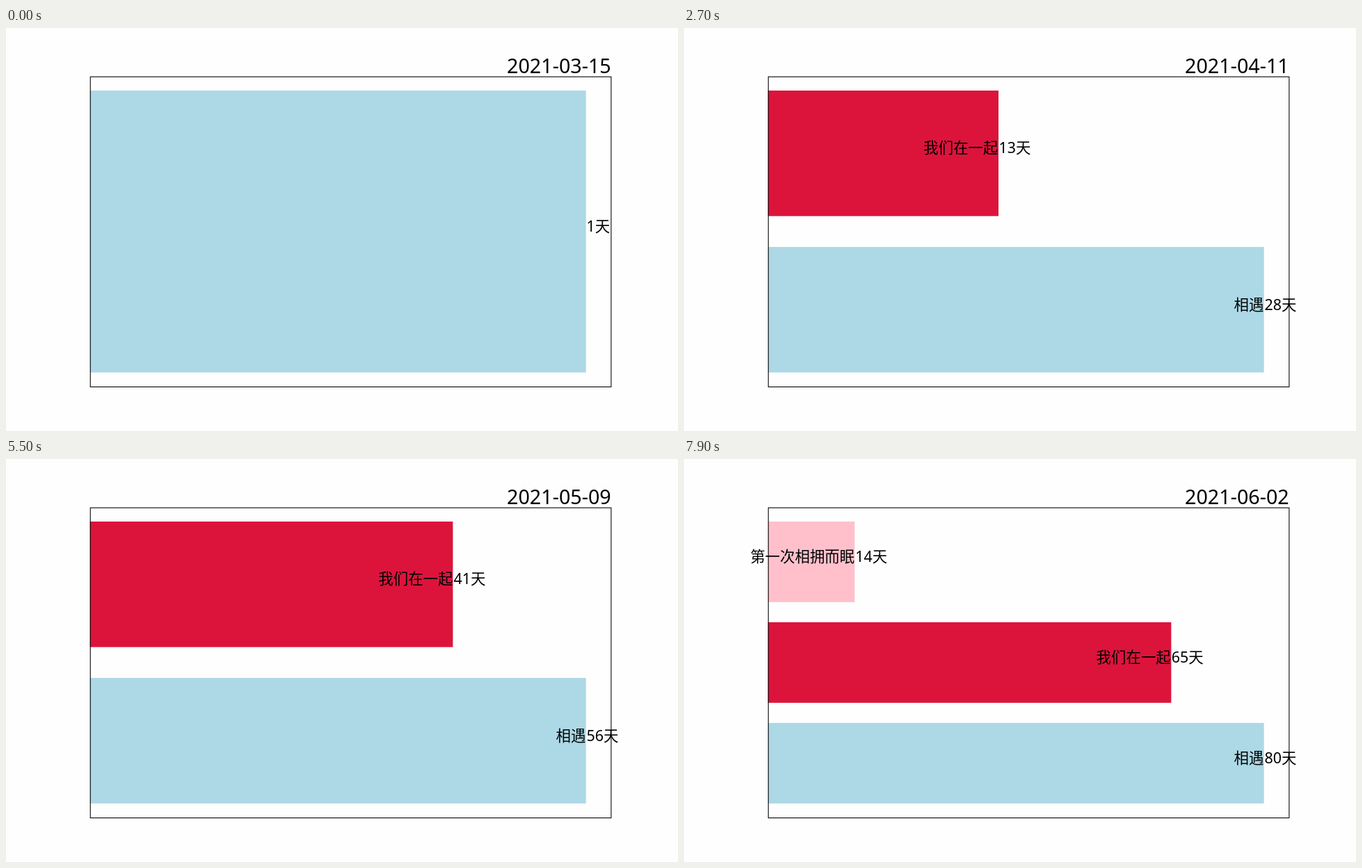
Animation of 966x580 px, one loop 8000 ms. Source, as an HTML page:

```html
<!DOCTYPE html>
<html lang="zh-CN">
<head>
<meta charset="utf-8">
<style>
  html, body { margin: 0; width: 100%; height: 100%; overflow: hidden; background: #fefefe; }
  svg { display: block; }
  text { font-family: "Noto Sans", "Noto Sans CJK SC", "Noto Sans CJK", sans-serif; fill: #000; white-space: pre; }
  .label { font-size: 22.2px; }
  .date { font-size: 29.7px; }
  .end { text-anchor: end; }
</style>
</head>
<body>
<svg width="966" height="580" viewBox="0 0 1000 600">
  <g id="bars"></g>
  <rect x="125.5" y="72.5" width="775" height="462" fill="none" stroke="#000" stroke-width="1.11"/>
  <g id="labels"></g>
  <text id="date" class="date end" x="900.4" y="67.1"></text>
</svg>
<script>
  const LOOP = 8000, STEP = 100;
  const LEFT = 125, FULL = 775 / 1.05, TOP = 93, BOTTOM = 513;
  const events = [
    { name: '相遇', color: '#add8e6', start: 0 },
    { name: '我们在一起', color: '#dc143c', start: 15 },
    { name: '第一次相拥而眠', color: '#ffc0cb', start: 66 }
  ];
  const byId = id => document.getElementById(id);

  function place(node, attrs) {
    for (const key in attrs) node.setAttribute(key, attrs[key]);
    return node;
  }

  function add(parent, tag, attrs) {
    const node = document.createElementNS('http://www.w3.org/2000/svg', tag);
    return byId(parent).appendChild(place(node, attrs));
  }

  for (const event of events) {
    event.bar = add('bars', 'rect', { fill: event.color });
    event.title = add('labels', 'text', { class: 'label end' });
    event.value = add('labels', 'text', { class: 'label' });
  }

  function draw(day) {
    const count = events.filter(e => day >= e.start).length;
    const pitch = (BOTTOM - TOP) / (count - 0.2);
    const height = pitch * 0.8;

    events.forEach((event, i) => {
      const days = day - event.start + 1;
      const display = days > 0 ? 'inline' : 'none';
      for (const node of [event.bar, event.title, event.value]) node.style.display = display;
      if (days <= 0) return;

      const bottom = BOTTOM - i * pitch;
      const top = Math.round(bottom - height);
      const end = LEFT + FULL * days / (day + 1);
      const baseline = Math.round(bottom - height / 2);
      place(event.bar, { x: LEFT, y: top, width: Math.round(end) - LEFT, height: Math.round(bottom) - top });
      place(event.title, { x: end - 0.3, y: baseline });
      place(event.value, { x: end + 0.7, y: baseline });
      // A bar gets its title from the second day on.
      event.title.textContent = days > 1 ? event.name : '';
      event.value.textContent = days + '天';
    });

    byId('date').textContent = new Date(Date.UTC(2021, 2, 15 + day)).toISOString().slice(0, 10);
  }

  let shown = -1;
  const began = performance.now();
  function tick() {
    const day = Math.floor((performance.now() - began) % LOOP / STEP);
    if (day !== shown) draw(shown = day);
    requestAnimationFrame(tick);
  }
  tick();
</script>
</body>
</html>
```
